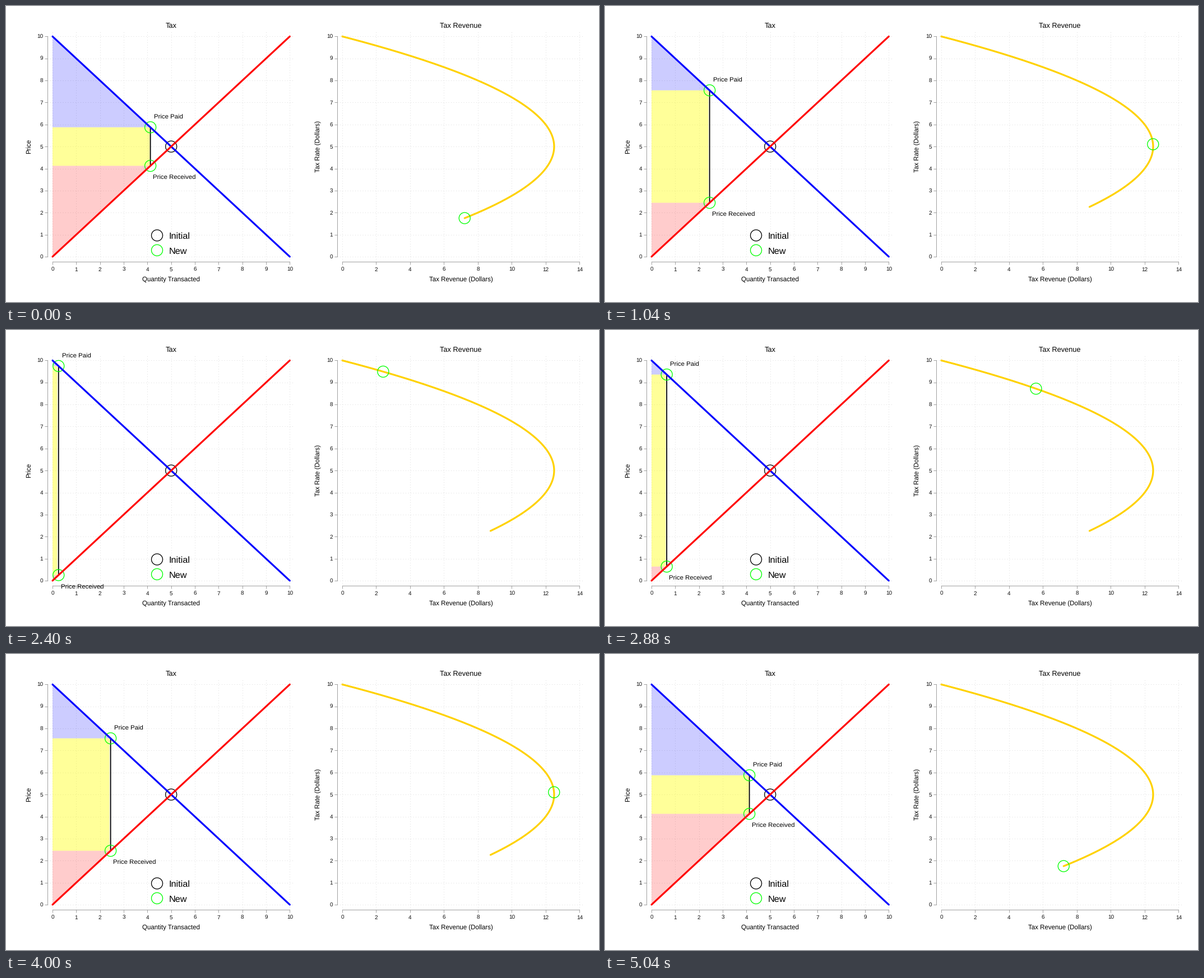
These frames come from a looping animation (1058x529 px, 5.12 s). A matplotlib script:

```python
import numpy as np
import matplotlib.pyplot as plt
from matplotlib.animation import FuncAnimation
from matplotlib.patches import Ellipse, Polygon

W, H, DPI = 1058, 529, 64
FRAMES, INTERVAL = 64, 80
HALF = FRAMES // 2
PLOT_WIDTH, PLOT_TOP, PLOT_BOTTOM, MARGIN = 423.3, 54.4, 448.0, 9
TAX_LOW, TAX_HIGH = 1.75, 9.75
CURVE_START = 2.26
GREEN = "#00ff00"


def px(n):
    """Pixels to points."""
    return n * 72 / DPI


plt.rcParams.update({"font.family": "Liberation Sans", "axes.axisbelow": True,
                     "text.hinting": "none"})
fig = plt.figure(figsize=(W / DPI, H / DPI), dpi=DPI, facecolor="white")


def label(x, y, text, size, **kw):
    """Text placed by stage pixels, y measured from the top."""
    kw = {"ha": "center", "va": "baseline", **kw}
    fig.text(x / W, 1 - y / H, text, fontsize=px(size), **kw)


def make_panel(left, x_max, x_step, title, x_title, y_title):
    """Axes whose data area starts at pixel `left`, plus a margin."""
    height = PLOT_BOTTOM - PLOT_TOP
    ax = fig.add_axes([(left - MARGIN) / W, 1 - (PLOT_BOTTOM + MARGIN) / H,
                       (PLOT_WIDTH + 2 * MARGIN) / W,
                       (height + 2 * MARGIN) / H])
    pad_x = MARGIN * x_max / PLOT_WIDTH
    pad_y = MARGIN * 10 / height
    ax.set(xlim=(-pad_x, x_max + pad_x), ylim=(-pad_y, 10 + pad_y),
           xticks=range(0, x_max + 1, x_step), yticks=range(11))
    ax.patch.set_visible(False)
    ax.grid(color="#dcdcdc", lw=px(1), ls=(0, (1, 3.5)))
    ax.tick_params(length=px(5), width=px(1), color="#a0a0a0",
                   labelsize=px(10), labelcolor="#111111")
    ax.tick_params(axis="x", pad=px(4.5))
    ax.tick_params(axis="y", pad=px(3))
    ax.spines[["top", "right"]].set_visible(False)
    for side, end in (("left", 10), ("bottom", x_max)):
        ax.spines[side].set(color="#a0a0a0", linewidth=px(1))
        ax.spines[side].set_bounds(0, end)
    middle = left + PLOT_WIDTH / 2
    label(middle, 40, title, 12.8)
    label(middle, 493, x_title, 11.5)
    label(left - 39, 251, y_title, 11.5, rotation=90,
          rotation_mode="anchor")
    return ax


def ring(ax, x, y, color, zorder, diameter=20):
    """Circle that is round on the stage and keeps sub-pixel positions."""
    x_max = ax.get_xticks()[-1]
    return ax.add_patch(Ellipse(
        (x, y), diameter * x_max / PLOT_WIDTH,
        diameter * 10 / (PLOT_BOTTOM - PLOT_TOP), fc="none", ec=color,
        lw=px(1.3), zorder=zorder, clip_on=False))


def fill(ax, color, alpha):
    return ax.add_patch(Polygon(np.zeros((4, 2)), fc=color, ec="none",
                                alpha=alpha, zorder=1, snap=False))


def point_label(ax, text, dx, dy):
    return ax.annotate(text, (0, 0), (px(dx), px(dy)),
                       textcoords="offset points", fontsize=px(11.4),
                       annotation_clip=False, zorder=6)


market = make_panel(83, 10, 1, "Tax", "Quantity Transacted", "Price")
revenue = make_panel(600, 14, 2, "Tax Revenue", "Tax Revenue (Dollars)",
                     "Tax Rate (Dollars)")

thick = dict(lw=px(3.2), solid_capstyle="round", clip_on=False)
market.plot([0, 10], [10, 0], color="#0000ff", zorder=4, **thick)
market.plot([0, 10], [0, 10], color="#ff0000", zorder=4.1, **thick)
ring(market, 5, 5, "black", 3)

for y, color, name in ((0.966, "black", "Initial"), (0.292, GREEN, "New")):
    ring(market, 4.406, y, color, 5)
    market.text(4.91, y - 0.16, name, fontsize=px(16.2), va="baseline")

consumer = fill(market, "#0000ff", 0.2)
treasury = fill(market, "#ffff00", 0.4)
producer = fill(market, "#ff0000", 0.2)
wedge, = market.plot([], [], color="black", lw=px(1.8), zorder=2,
                     solid_capstyle="butt", snap=False)
paid_ring = ring(market, 0, 0, GREEN, 3)
received_ring = ring(market, 0, 0, GREEN, 3)
paid_text = point_label(market, "Price Paid", 6, 15)
received_text = point_label(market, "Price Received", 4.2, -24.5)

curve, = revenue.plot([], [], color="#ffd200", zorder=3, **thick)
revenue_ring = ring(revenue, 0, 0, GREEN, 4)


def collected(tax):
    return tax * (10 - tax) / 2


def draw(frame):
    step = min(frame, FRAMES - 1 - frame)
    tax = TAX_LOW + (TAX_HIGH - TAX_LOW) * step / (HALF - 1)
    q = (10 - tax) / 2
    paid = 10 - q
    edge = np.floor(q * 10 + 1e-6) / 10  # areas are sampled every 0.1

    consumer.set_xy([(0, 10), (0, paid), (edge, paid), (edge, 10 - edge)])
    treasury.set_xy([(0, q), (0, paid), (edge, paid), (edge, q)])
    producer.set_xy([(0, 0), (0, q), (edge, q), (edge, edge)])
    wedge.set_data([q, q], [q, paid])

    for y, mark, text in ((paid, paid_ring, paid_text),
                          (q, received_ring, received_text)):
        mark.set_center((q, y))
        text.xy = (q, y)

    rates = np.linspace(min(tax, CURVE_START), 10, 200)
    curve.set_data(collected(rates), rates)
    revenue_ring.set_center((collected(tax), tax))
    return (consumer, treasury, producer, wedge, paid_ring, received_ring,
            paid_text, received_text, curve, revenue_ring)


animation = FuncAnimation(fig, draw, frames=FRAMES, interval=INTERVAL,
                          repeat=True, repeat_delay=0, blit=False)
plt.show()
```
